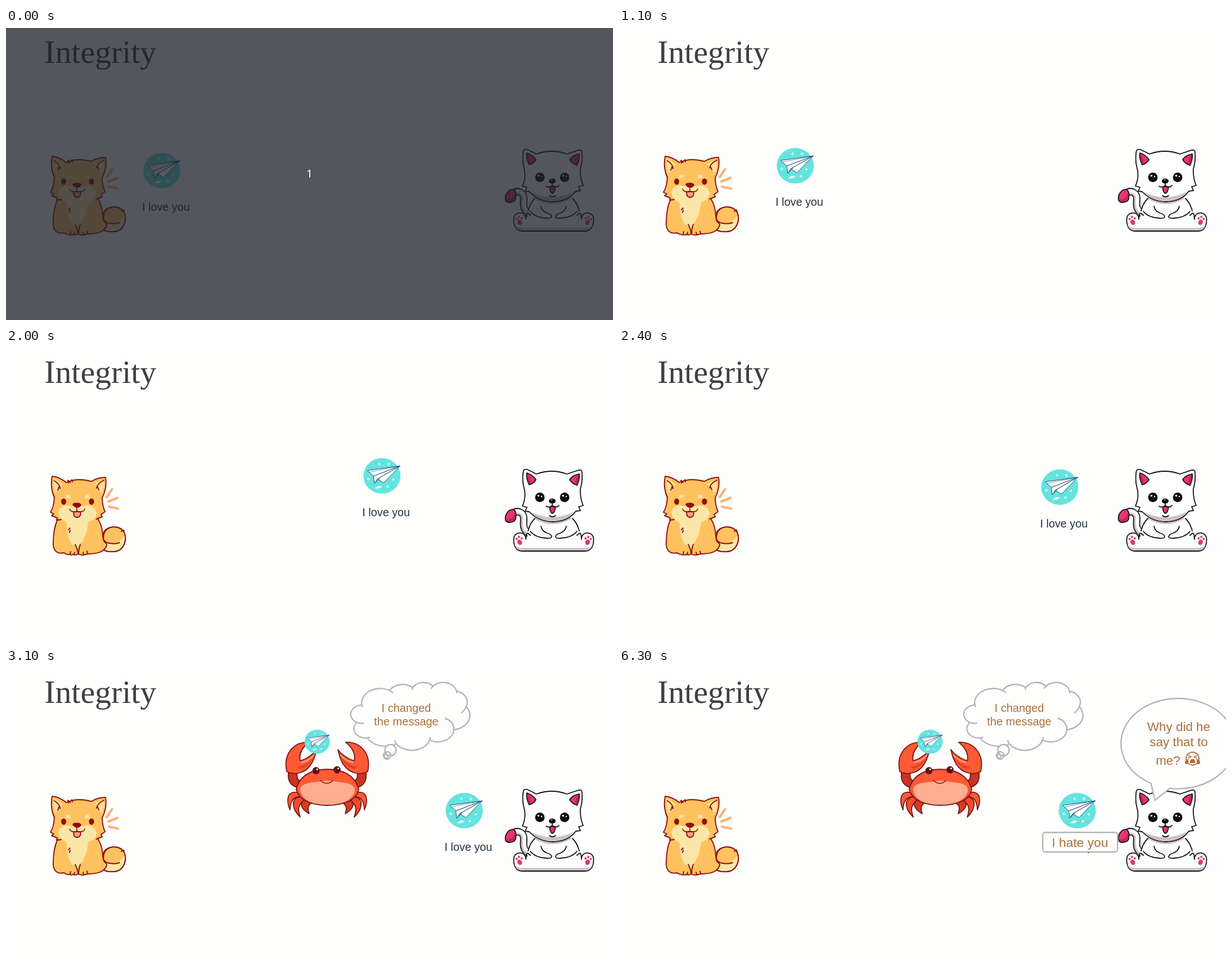
Animation of 1079 by 519 pixels, one loop 9500 ms. Source, as an HTML page:

```html
<!DOCTYPE html>
<html lang="en">
<head>
<meta charset="utf-8">
<title>Integrity</title>
<style>
html, body { margin: 0; width: 100%; height: 100%; overflow: hidden; background: #fefefd; }
svg { display: block; width: 100%; height: 100%; }
text { font-family: "Liberation Sans", Arial, sans-serif; font-size: 20px; }
.title { font: 57.8px "Liberation Serif", "Times New Roman", serif; fill: #404040; }
.note { fill: #a9703d; text-anchor: middle; }
.big { font-size: 22.4px; }
.count { font: 20px "Noto Sans", "Open Sans", sans-serif; fill: #fff; text-anchor: middle; }
.box { fill: #fefefd; stroke: #b5b5b5; stroke-width: 2.4; }
.dog, .cat, .crab { stroke-linecap: round; stroke-linejoin: round; }
.dog { stroke: #8f0e0e; stroke-width: 1.9; fill: #ffc25f; }
.cat { stroke: #141214; stroke-width: 1.8; fill: #fefefe; }
.crab { stroke: #7c1513; stroke-width: 1.8; fill: #ff5a35; }
.line { fill: none; }
.flat { stroke: none; }
.cream { fill: #fbe6a8; }
.shade { fill: #cdc2c8; }
.pink { fill: #e7356f; }
.wine { fill: #bd2460; }
</style>
</head>
<body>
<svg viewBox="0 0 1079 519">
  <defs>
    <g id="plane">
      <ellipse rx="33" ry="31.6" fill="#64e4de"/>
      <g fill="none" stroke="#fff" stroke-width="1.2">
        <path d="M-5 -23.5v5M-7.500 -21h5M20 4v5M17.500 6.500h5"/>
        <circle cx="12" cy="-21" r="1.6"/>
        <circle cx="-24" cy="5.700" r="1.6"/>
        <circle cx="10" cy="18.700" r="1.6"/>
      </g>
      <path d="M-13 22q1 -2 4 -2q1 -3 4 -2h5q-1 3 -4 3q-1 2 -4 1.500z" fill="#fff"/>
      <g fill="#fff" stroke="#1d5079" stroke-linejoin="round">
        <path d="M-26 -9.500L32 -17.500L-15 .500z"/>
        <path d="M-15 .500L-13.500 13.500L-8 5.500L32 -17.500z"/>
        <path d="M-8 5.500L3 12.500L32 -17.500z"/>
        <path d="M-13.500 13.500L-4 4" fill="none"/>
        <path d="M-23 -6.500L32 -17.500" fill="none" stroke-width=".6"/>
      </g>
    </g>
    <g id="half">
      <path d="M621 222q15 -4 19 6q3 12 -3 24q0 -13 -6 -19q-5 -5 -12 -4z"/>
      <path d="M616 228q12 1 15 10q2 14 -12 27q5 -15 1 -21q-4 -7 -11 -8z" fill="#ee4b2c"/>
      <path d="M606 234q10 0 11 8q0 9 -14 17q3 -9 1 -14q-3 -4 -6 -6z" fill="#d63d25"/>
      <path d="M624 184L639 180Q643 200 634 207Q628 213 621 211L617 202Q627 199 624 184z" fill="#c93522"/>
      <path d="M604 132C630 131 650 152 643 184Q632 190 619 186Q597 180 590 145Q600 159 619 165Q623 148 604 132z"/>
      <path class="flat" d="M594 156q7 18 25 24l5 -4q-20 -5 -28 -17z" fill="#e04428"/>
      <path class="line" d="M595 155q8 10 22 13" stroke="#ffb296" stroke-width="2"/>
    </g>
    <g id="catside">
      <path class="line" d="M940 303Q931 312 928 325M932 326Q941 337 961 338Q970 339 970 335Q969 331 962 329Q953 326 951 317"/>
      <path class="flat" d="M925 335C921 324 906 327 903 336C901 346 904 359 917 361H974V340H930z"/>
      <path class="line" d="M932 333C925 326 925 329 924 340C924 325 906 326 903 336C901 348 905 361 918 361H974"/>
      <path class="flat shade" d="M904 350Q909 355.500 920 355.500H974V360H918Q907 360 904 350z"/>
      <g class="flat pink">
        <ellipse cx="913.200" cy="345.300" rx="4" ry="5" transform="rotate(-25 913.200 345.300)"/>
        <circle cx="907.600" cy="339.500" r="2"/>
        <circle cx="911.800" cy="335.800" r="2"/>
        <circle cx="916.700" cy="338.300" r="2"/>
      </g>
    </g>
    <g id="cateye" class="flat">
      <circle r="8.4" fill="#0d0c0d"/>
      <circle cx="-2.500" cy="-3" r="1.8"/>
      <circle cx="3" cy="-1.500" r="1.2"/>
    </g>
    <path id="tail" d="M930 330C910 318 929 300 914 292Q906 288 899 297"/>
  </defs>

  <text class="title" x="68.200" y="61.500">Integrity</text>

  <g class="dog">
    <path d="M174 331C178 315 202 314 210 327C216 342 209 361 192 362Q178 363 171 357z"/>
    <path class="flat cream" d="M173 357Q182 353 178 346Q198 352 211 333Q214 359 192 361Q180 362 173 357z"/>
    <path class="line" d="M172 358Q178 363 192 362C209 361 216 342 210 327C202 314 178 315 173 329Q170 345 184 347Q193 349 202 346M210 324q-3 0 -5 2"/>
    <path d="M92 304Q84 321 84 345C83 359 90 367 103 364Q110 369 120 367Q124 369 128 366Q134 370 145 366Q163 366 171 361Q182 352 178 347Q172 344 172 333Q171 315 163 303z"/>
    <path class="flat cream" d="M108 304Q106 332 117 349L127 354Q146 336 146 304z"/>
    <path class="line" d="M123 349Q128 359 128 366M132 349Q129 357 129 366M114 366l1 -4M121 367l1 -4M138 367l-1 -4M145 365l-1 -4M111 323l3 -3M113 328l1 -4"/>
    <path class="flat" d="M82 228Q95 229 107 239Q126 230 152 237Q163 230 177 230Q180 249 171 266Q171 280 176 291L169 296L170 300L158 305Q127 315 94 306L89 301L82 298L84 295L79 292Q85 283 85 269Q78 249 82 228z"/>
    <path class="flat cream" d="M93 292Q97 279 110 280Q120 283 126 277Q133 283 143 280Q157 279 161 293Q160 305 147 309Q126 314 106 309Q94 304 93 292z"/>
    <path class="flat" d="M85 233Q95 236 101 244L94 248L95 253L88 258Q83 245 85 233zM174 234Q164 236 157 243L164 248L163 252L171 257Q176 245 174 234z" fill="#fbdf9b"/>
    <path class="line" d="M107 239Q95 229 82 228Q78 249 86 265Q85 283 79 292L85 295L81 298L91 302L90 306L98 305M111 240l-1 -5l4 4M118 238l-1 -4M107 239Q126 230 152 237Q163 230 177 230Q180 249 171 266Q171 280 176 291L169 296L171 300L161 304M86 236Q96 242 96 250M94 247l-2 6M174 235Q162 241 161 249M163 247l2 5"/>
    <g class="flat" fill="#fbdf9b"><ellipse cx="111" cy="264" rx="4.500" ry="3.500"/><ellipse cx="144.500" cy="264" rx="4.500" ry="3.500"/></g>
    <g class="flat" fill="#8f0e0e">
      <ellipse cx="102.500" cy="273" rx="4.400" ry="5.500"/><ellipse cx="152" cy="273" rx="4.600" ry="5.500"/>
      <path d="M118 278Q119 275 126 275Q133 275 134 279Q132 284 126 284Q120 283 118 278z"/>
    </g>
    <path d="M120.500 291Q119 301 127 301Q134 300 132.500 291z" fill="#ff9e83"/>
    <path class="line" d="M126 284V290M113 286Q115 293 126 290Q138 293 140 286" stroke-width="1.6"/>
    <path class="line" d="M179 265L188.500 251M182 273L198 266.500M183 282L199 285.500" stroke="#ffb078" stroke-width="4.200"/>
  </g>

  <g class="cat">
    <g class="line" stroke-linecap="butt">
      <use href="#tail" stroke-width="13"/>
      <use href="#tail" stroke="#cdc2c8" stroke-width="9.5"/>
      <use href="#tail" stroke="#fefefe" stroke-width="6" transform="translate(1.500 -1)"/>
    </g>
    <path class="pink" d="M902 287C893 286 886 297 888 306Q891 312 901 309Q908 306 906 297Q908 292 902 287z"/>
    <path class="flat wine" d="M889 305Q902 305 904 293Q908 304 900 308Q891 311 889 305z"/>
    <path class="flat" d="M940 300Q925 318 928 340H1019Q1019 318 1006 300z"/>
    <path class="flat shade" d="M938 303Q972 323 1006 303L1000 298H942z"/>
    <use href="#catside"/>
    <use href="#catside" transform="matrix(-1 0 0 1 1947 0)"/>
    <path d="M919 240Q918 224 920 218Q922 214 929 217L943 224Q970 214 997 224L1018 217Q1024 216 1024 221Q1025 238 1021 250Q1020 266 1026 280L1018 282L1021 289L1013 290Q1000 308 972 309Q946 308 930 291L923 290L926 283L918 281Q924 268 922 254z"/>
    <path class="flat shade" d="M932 291Q972 311 1011 290Q998 307 972 308Q946 307 932 291z"/>
    <path class="pink" d="M926 222Q937 226 942 234Q938 241 930 243Q924 231 926 222zM1019 224Q1007 226 1002 234Q1006 241 1015 244Q1020 234 1019 224z"/>
    <path class="flat wine" d="M927 224Q933 231 932 241L930 242Q925 231 927 224zM1018 225Q1011 232 1013 242L1015 243Q1019 233 1018 225z"/>
    <use href="#cateye" x="949" y="265.500"/>
    <use href="#cateye" x="993" y="265.500"/>
    <ellipse class="flat" cx="971" cy="272" rx="6" ry="4.600" fill="#0d0c0d"/>
    <ellipse class="flat" cx="970" cy="270" rx="1.700" ry=".8"/>
    <path class="pink" d="M966.500 283Q967 293 971.500 294Q976 292 976.500 283Q972 280 966.500 283z"/>
    <path class="line" d="M971 277V280M960 281Q965 285 971 280Q978 285 983 280M966 298Q971 302 977 298"/>
  </g>

  <g id="letter">
    <use href="#plane" x="277" y="253.500"/>
    <text x="242" y="325" fill="#22323e" style="font-size:19.8px">I love you</text>
  </g>

  <g id="thief">
    <g class="crab">
      <use href="#half"/>
      <use href="#half" transform="matrix(-1 0 0 1 1142 0)"/>
      <path d="M516 215C522 190 545 180 571 180C598 180 620 190 627 215C624 235 600 244 571 244C543 244 520 235 516 215z"/>
      <path class="flat" d="M523 217C523 203 545 204 571 200C598 204 620 203 620 217C617 236 596 243 571 243C547 243 526 236 523 217z" fill="#fdae90"/>
      <path class="line" d="M559 200Q571 210 581 200" stroke-width="1.500"/>
      <g class="flat" fill="#651014"><circle cx="551" cy="182.500" r="6.400"/><circle cx="588.500" cy="181" r="6.400"/></g>
      <g class="flat" fill="#fff"><circle cx="553" cy="180" r="1.600"/><circle cx="590.500" cy="178.500" r="1.600"/></g>
    </g>
    <use href="#plane" transform="translate(553 131) scale(.68)"/>
    <path class="box" d="M632.500 65.600A33 25.600 0 0 1 682 40A26 20.300 0 0 1 723 35A21.300 16.600 0 0 1 759 32.400A23.700 18.400 0 0 1 800.700 41A26 20.300 0 0 1 818 68.600A33 25.700 0 0 1 796 109.700A28.300 22 0 0 1 753 128A33 25.700 0 0 1 694 135A37.700 29.400 0 0 1 642 124.400A21.300 16.500 0 0 1 624 96.800A21.200 16.600 0 0 1 632.500 65.600z"/>
    <path class="box line" style="fill:none" d="M624 96.800Q630 99 636.400 98M642 124.400L647.300 123M694 135L690.600 128.500M753 128L754.300 122.400M780 89.500Q796 94 796 109.700M818 68.600Q815 76 809 80M800.700 41L801.500 45M759 32.400L755.500 36.500M723 35L721.600 38.700M682 40L688 44M632.500 65.600L633.700 69.500"/>
    <circle class="box" cx="683.500" cy="146" r="10"/>
    <g class="box" style="fill:none">
      <circle cx="677.500" cy="155.500" r="6.600"/>
      <circle cx="675.800" cy="157" r="3.400"/>
    </g>
    <text class="note" x="711.500" y="78">I changed</text>
    <text class="note" x="711.500" y="102">the message</text>
  </g>

  <g id="hate">
    <rect class="box" x="753.200" y="292.200" width="133" height="34.800" rx="5"/>
    <text class="note" x="819.500" y="317.500" style="font-size:22.900px">I hate you</text>
  </g>

  <g id="reply">
    <path class="box" d="M945.500 205A101.500 80.300 0 1 1 979 213.800L953 235z"/>
    <text class="note big" x="995" y="112">Why did he</text>
    <text class="note big" x="995" y="138.500">say that to</text>
    <text class="note big" x="976" y="172">me?</text>
    <g transform="translate(1019.500 161)" fill="none" stroke="#a9703d" stroke-width="1.9" stroke-linecap="round" stroke-linejoin="round">
      <circle r="11.500"/>
      <path d="M-7.500 -5.500l5 2.500l-5 2M7.500 -5.500l-5 2.500l5 2" stroke-width="1.600"/>
      <path d="M-4.500 7Q-4 1 0 1Q4 1 4.500 7z" fill="#a9703d" stroke-width="1"/>
      <path d="M-8 1Q-14 4 -13 8Q-10 12 -8 7zM8 1Q14 4 13 8Q10 12 8 7z" fill="#a9703d" stroke-width="1"/>
    </g>
  </g>

  <g id="veil">
    <rect width="1079" height="519" fill="#1d212b" opacity=".76"/>
    <text class="count" x="539.500" y="266">1</text>
  </g>
</svg>
<script>
const LOOP = 9500, STEP = 100;
const DEPART = 730, FLIGHT = 2012, REACH = 537.6, RISE = 36;
const parts = Object.fromEntries(
  ["letter", "thief", "hate", "reply", "veil"].map(id => [id, document.getElementById(id)]));

const clamp = v => Math.min(1, Math.max(0, v));
const ease = p => p < .5 ? 2 * p * p : 1 - 2 * (1 - p) ** 2;
const show = (part, on) => part.setAttribute("visibility", on ? "visible" : "hidden");

function draw(ms) {
  const t = Math.floor(ms % LOOP / STEP) * STEP;
  const u = ease(clamp((t - DEPART) / FLIGHT));
  const dx = REACH * u, dy = -RISE * Math.sin(Math.PI * u ** .95);
  parts.letter.setAttribute("transform", `translate(${dx.toFixed(2)} ${dy.toFixed(2)})`);
  show(parts.veil, t < 100);
  show(parts.thief, t >= 3100);
  show(parts.hate, t >= 4600);
  show(parts.reply, t >= 6300);
}

const begin = performance.now();
function tick() {
  draw(performance.now() - begin);
  requestAnimationFrame(tick);
}
draw(0);
requestAnimationFrame(tick);
</script>
</body>
</html>
```
